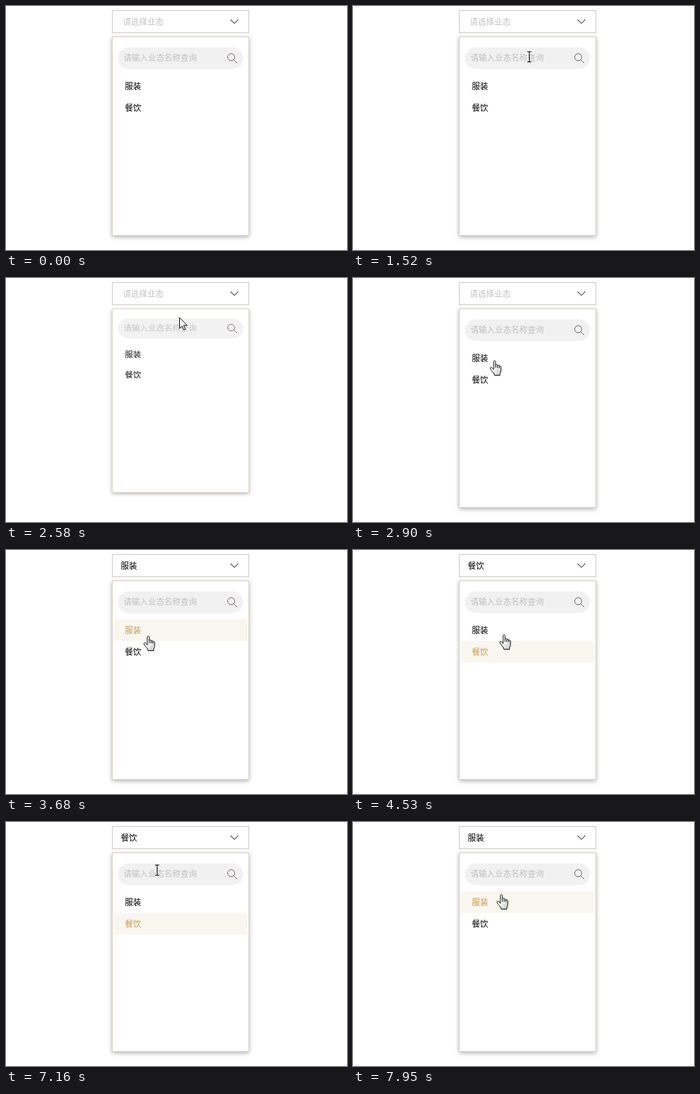
An HTML page for the animation above (8000 ms loop, 502 by 360 pixels).

```html
<!DOCTYPE html>
<html lang="zh-CN">
<head>
<meta charset="utf-8">
<style>
  html, body { margin: 0; width: 100%; height: 100%; overflow: hidden; background: #fff; }
  svg { display: block; }
  text { font: 12px "Noto Sans CJK SC", "Noto Sans CJK", sans-serif; fill: #000; }
  .hint { fill: #c0c0c0; }
  .line { fill: none; stroke: #6b5a5a; stroke-width: 1; }
  .frame { fill: #fff; stroke: #c8c8c8; }
  #menu { filter: drop-shadow(0 2px 3px rgba(0, 0, 0, .3)); }
  #menu .frame { stroke: #d8d2c4; }
  #cursor path { fill: #fff; stroke: #000; stroke-linejoin: round; }
  #cursor #palm { fill: url(#shade); }
</style>
</head>
<body>
<svg width="502" height="360" viewBox="0 0 502 360">
  <linearGradient id="shade" x2=".8" y2="1">
    <stop offset=".45" stop-color="#fff"/><stop offset="1" stop-color="#c8c8c8"/>
  </linearGradient>
  <rect class="frame" x="156.5" y="6.5" width="201" height="33"/>
  <text id="value" y="28"></text>
  <path class="line" d="M330.5 20l5.7 5.7l5.7-5.7" style="stroke-width:1.2"/>
  <g id="panel">
    <g id="menu"><rect class="frame" x="156.5" y="45.5" width="201" height="293"/></g>
    <rect x="165" y="61" width="184" height="32" rx="16" fill="#f1f1f1"/>
    <text class="hint" x="173" y="81">请输入业态名称查询</text>
    <path id="caret" d="M173.5 70v14" stroke="#000"/>
    <circle class="line" cx="331.5" cy="75.5" r="5.2"/>
    <path class="line" d="M335.2 79.2l5 5"/>
    <rect id="mark" x="159" width="196" height="32" rx="2" fill="#f9f6ef"/>
    <text class="row" x="175" y="123">服装</text>
    <text class="row" x="175" y="155">餐饮</text>
  </g>
  <g id="cursor">
    <path id="arrow" d="M.5.5V16.5L4.2 13L6.7 18.7L9 17.7L6.5 12H11.8Z"/>
    <path id="beam" d="M-2.5-7.5h6M-2.5 7.5h6M.5-7.5v15"/>
    <g id="hand" transform="translate(-.5 .5)">
      <path id="palm" d="M-.5 12V2C-.5 0 2.4 0 2.4 2V7C2.4 5.6 5 5.6 5 7.3V8C5 6.6 7.6 6.7 7.6 8.4V9.2C7.6 8 10.4 8 10.4 10V15C10.4 17.5 8.8 19 8.8 22H.6C.6 18.5-4 16-5.4 12C-5.8 10-3.5 9.6-2.3 11.4L-.5 13.6Z"/>
      <path d="M2.4 7v4M5 8v3M7.6 9v2.5"/>
    </g>
  </g>
</svg>
<script>
const $ = id => document.getElementById(id);
const LOOP = 8000, BLINK = 510, CLOSE = 1860, OPEN = 2460;
const ROWS = ['服装', '餐饮'], ROW_TOP = 102, ROW_HEIGHT = 32;

// Pointer script: when it sets off, where it goes, when it clicks there
const script = [
  { at: 440, x: 259, y: 75, click: 1010 },
  { at: 1590, x: 255, y: 27, click: CLOSE },
  { at: 2440, x: 255, y: 58 },
  { at: 2680, x: 208, y: 121, click: 3130 },
  { at: 3645, x: 215, y: 156, click: 4060 },
  { at: 4340, x: 222, y: 124, click: 4700 },
  { at: 4960, x: 222, y: 149, click: 5310 },
  { at: 5290, x: 222, y: 71, click: 5620 },
  { at: 7440, x: 215, y: 118, click: 7880 },
  { at: 7860, x: 218, y: 106 }
];

const clamp = p => Math.max(0, Math.min(1, p));
const smooth = p => p * p * (3 - 2 * p);
const zoom = (t, start) => 1 - (1 - clamp((t - start) / 300)) ** 5;
const show = (el, on) => el.setAttribute('display', on ? 'inline' : 'none');

// The travel time grows with the square root of the distance
function pointer(t) {
  let x = 373, y = 273;
  for (const move of script) {
    const dx = move.x - x, dy = move.y - y;
    const p = smooth(clamp((t - move.at) / (25 * Math.sqrt(Math.hypot(dx, dy)))));
    x += dx * p;
    y += dy * p;
    if (p < 1) break;
  }
  return [Math.round(x), Math.round(y)];
}

function hit(x, y, open) {
  const inside = (l, t, r, b) => x >= l && x < r && y >= t && y < b;
  if (inside(156, 6, 358, 40)) return 'select';
  if (open && inside(165, 61, 349, 93)) return 'search';
  if (open && inside(159, ROW_TOP, 355, ROW_TOP + 2 * ROW_HEIGHT)) return 'row';
  return 'page';
}
const CURSORS = { select: 'hand', search: 'beam', row: 'hand', page: 'arrow' };

function draw(t) {
  const open = 1 - zoom(t, CLOSE) + zoom(t, OPEN);
  $('panel').setAttribute('transform', `translate(0 ${45 * (1 - open)}) scale(1 ${open})`);
  $('panel').setAttribute('opacity', open);
  show($('panel'), open > 0);

  // Clicks so far decide the selected row and the focus
  let pick = -1, focus = null;
  for (const { x, y, click } of script) {
    if (!(click <= t)) continue;
    const target = hit(x, y, true);
    if (target === 'row') pick = Math.floor((y - ROW_TOP) / ROW_HEIGHT);
    focus = target === 'search' ? click : null;
  }
  const value = $('value');
  value.textContent = pick < 0 ? '请选择业态' : ROWS[pick];
  value.setAttribute('x', pick < 0 ? 172 : 169);
  value.setAttribute('class', pick < 0 ? 'hint' : '');
  show($('mark'), pick >= 0);
  $('mark').setAttribute('y', ROW_TOP + ROW_HEIGHT * pick);
  document.querySelectorAll('.row').forEach((row, i) => {
    row.style.fill = i === pick ? '#c49a55' : '#000';
  });
  show($('caret'), focus !== null && Math.floor((t - focus) / BLINK) % 2 === 0);

  const [x, y] = pointer(t);
  const cursor = CURSORS[hit(x, y, open > 0.5)];
  show($('cursor'), t >= script[0].at);
  $('cursor').setAttribute('transform', `translate(${x} ${y})`);
  for (const id of ['arrow', 'beam', 'hand']) show($(id), id === cursor);
}

const origin = performance.now();
function tick() {
  draw((performance.now() - origin) % LOOP);
  requestAnimationFrame(tick);
}
tick();
</script>
</body>
</html>
```
